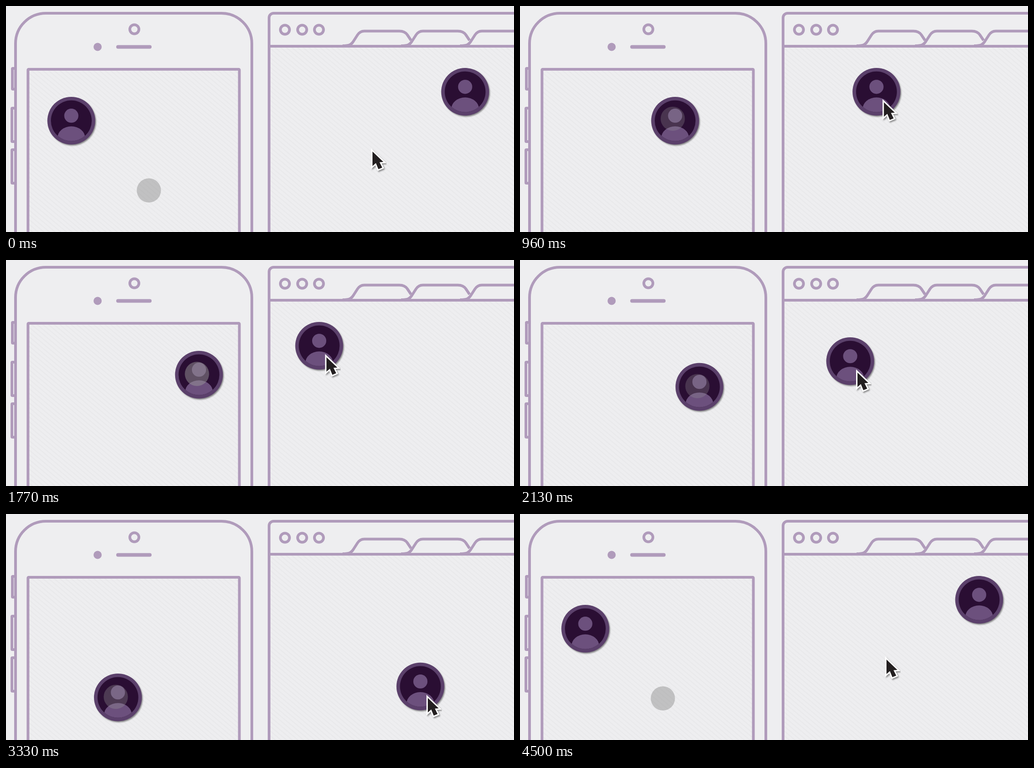
Recreate the animation shown at these times as an HTML page. Size 1120 by 500 pixels, loop 5850 ms.

```html
<!DOCTYPE html>
<html lang="en">
<head>
<meta charset="utf-8">
<title>Dragging avatars on two devices</title>
<style>
  html, body { margin: 0; width: 100%; height: 100%; overflow: hidden; background: #eeeef0; }
  svg { display: block; width: 100vw; height: 100vh; }
  .line { fill: none; stroke: #b09bbb; stroke-width: 6; stroke-linejoin: round; }
</style>
</head>
<body>
<svg viewBox="0 0 1120 500">
  <defs>
    <pattern id="hatch" width="20" height="8" patternUnits="userSpaceOnUse" patternTransform="rotate(40)">
      <rect width="20" height="2.6" fill="#e9e9eb"/>
    </pattern>
    <filter id="soft" x="-20%" y="-20%" width="140%" height="140%">
      <feGaussianBlur stdDeviation="1.5"/>
    </filter>
    <clipPath id="disc"><circle r="45"/></clipPath>
    <g id="avatar">
      <circle cx="2" cy="2.5" r="52.5" fill="#000" opacity=".45" filter="url(#soft)"/>
      <circle r="52.8" fill="#5b406b"/>
      <circle r="45" fill="#2a0e33"/>
      <g fill="#6c507d">
        <circle cy="-11" r="15.6"/>
        <ellipse cy="38" rx="30.5" ry="25.5" clip-path="url(#disc)"/>
      </g>
    </g>
    <path id="arrow" d="M2 3V35L9.5 28.5L15 42L23.5 38.5L17.5 26.5L26 26Z"/>
    <path id="tab" d="M742 88C757 88 762 85 766 78L775 64C779 58 783 55.5 790 55.5H867C876 55.5 881 58 885 64L893 76"/>
  </defs>

  <rect width="1120" height="500" fill="#eeeef0"/>
  <g fill="url(#hatch)">
    <rect x="48" y="140" width="466" height="360"/>
    <rect x="580" y="89" width="540" height="411"/>
  </g>

  <g class="line">
    <rect x="14" y="138" width="7" height="46" rx="1"/>
    <rect x="13" y="226" width="8" height="74" rx="1"/>
    <rect x="13" y="318" width="8" height="74" rx="1"/>
    <path d="M21 510V83A67 67 0 0 1 88 16H475A67 67 0 0 1 542 83V510"/>
    <rect x="48.5" y="140" width="466" height="400" rx="1.5"/>
    <circle cx="283" cy="51.5" r="10"/>
    <path d="M247 90.5H317" stroke-width="8" stroke-linecap="round" style="stroke-width:8"/>
    <path d="M580 510V26A10 10 0 0 1 590 16H1130M580 89H1130"/>
    <circle cx="615" cy="52.5" r="10"/>
    <circle cx="653" cy="52.5" r="10"/>
    <circle cx="690" cy="52.5" r="10"/>
    <use href="#tab"/>
    <use href="#tab" x="129"/>
    <use href="#tab" x="259"/>
  </g>
  <circle cx="202" cy="90.5" r="9" fill="#b09bbb"/>

  <use id="phone" href="#avatar"/>
  <use id="web" href="#avatar"/>
  <circle id="touch" r="26.7" fill="#999"/>
  <g id="cursor">
    <use href="#arrow" x="2" y="2.5" stroke="#000" stroke-width="6" opacity=".4" filter="url(#soft)"/>
    <use href="#arrow" fill="#231f20" stroke="#fff" stroke-width="6" style="paint-order:stroke"/>
  </g>
</svg>
<script>
const LOOP = 5850, STEP = 30, CYCLE = 1350;
const el = id => document.getElementById(id);

// Symmetric ease-in-out: a cubic Bezier with handles (.71, 0) and (.29, 1).
function ease(x) {
  const a = 0.71;
  let lo = 0, hi = 1;
  for (let i = 0; i < 24; i++) {
    const s = (lo + hi) / 2, r = 1 - s;
    if (3 * a * s * r * r + 3 * (1 - a) * s * s * r + s * s * s < x) lo = s; else hi = s;
  }
  return lo * lo * (3 - 2 * lo);
}

// Each key: [start, end, ...values]; holds before start and after end.
function track(keys, t) {
  let value = keys[0].slice(2);
  for (const [start, end, ...next] of keys.slice(1)) {
    if (t <= start) break;
    const f = ease(Math.min(1, (t - start) / (end - start)));
    value = value.map((v, i) => v + (next[i] - v) * f);
  }
  return value;
}

// Three drags of 900 ms, one at the end of each cycle.
const drags = points => points.map((p, i) => [450 + CYCLE * i, CYCLE * (i + 1), ...p]);

const avatarKeys = (home, second, third) => [[0, 0, ...home], ...drags([second, third, home])];
const pointerKeys = (rest, grab, ...stops) =>
  [[0, 0, ...rest], [0, 450, ...grab], ...drags(stops), [4050, 4500, ...rest]];

const tracks = {
  phone: avatarKeys([144, 253.7], [425.5, 253.7], [250.5, 411.3]),
  web: avatarKeys([1012.3, 189.8], [690.5, 189.8], [910, 388.5]),
  touch: pointerKeys([315, 408], [137, 243], [421, 252], [246, 410], [135, 254]),
  cursor: pointerKeys([806, 319], [1027.6, 205], [704.5, 212], [924, 411], [1038, 215])
};

const FULL = 0.53, PRESSED = 0.27;
const alpha = [[0, 0, FULL]];
for (let i = 0; i < 3; i++) {
  const c = CYCLE * i;
  alpha.push([c + (i ? 150 : 450), c + 900, PRESSED], [c + 900, c + CYCLE, FULL]);
}

function draw(t) {
  for (const id in tracks) {
    const [x, y] = track(tracks[id], t);
    el(id).setAttribute('transform', `translate(${x.toFixed(2)} ${y.toFixed(2)})`);
  }
  el('touch').setAttribute('opacity', track(alpha, t)[0].toFixed(3));
}

const begin = performance.now();
function tick() {
  const t = (performance.now() - begin) % LOOP;
  draw(Math.floor(t / STEP) * STEP);
  requestAnimationFrame(tick);
}
draw(0);
requestAnimationFrame(tick);
</script>
</body>
</html>
```
